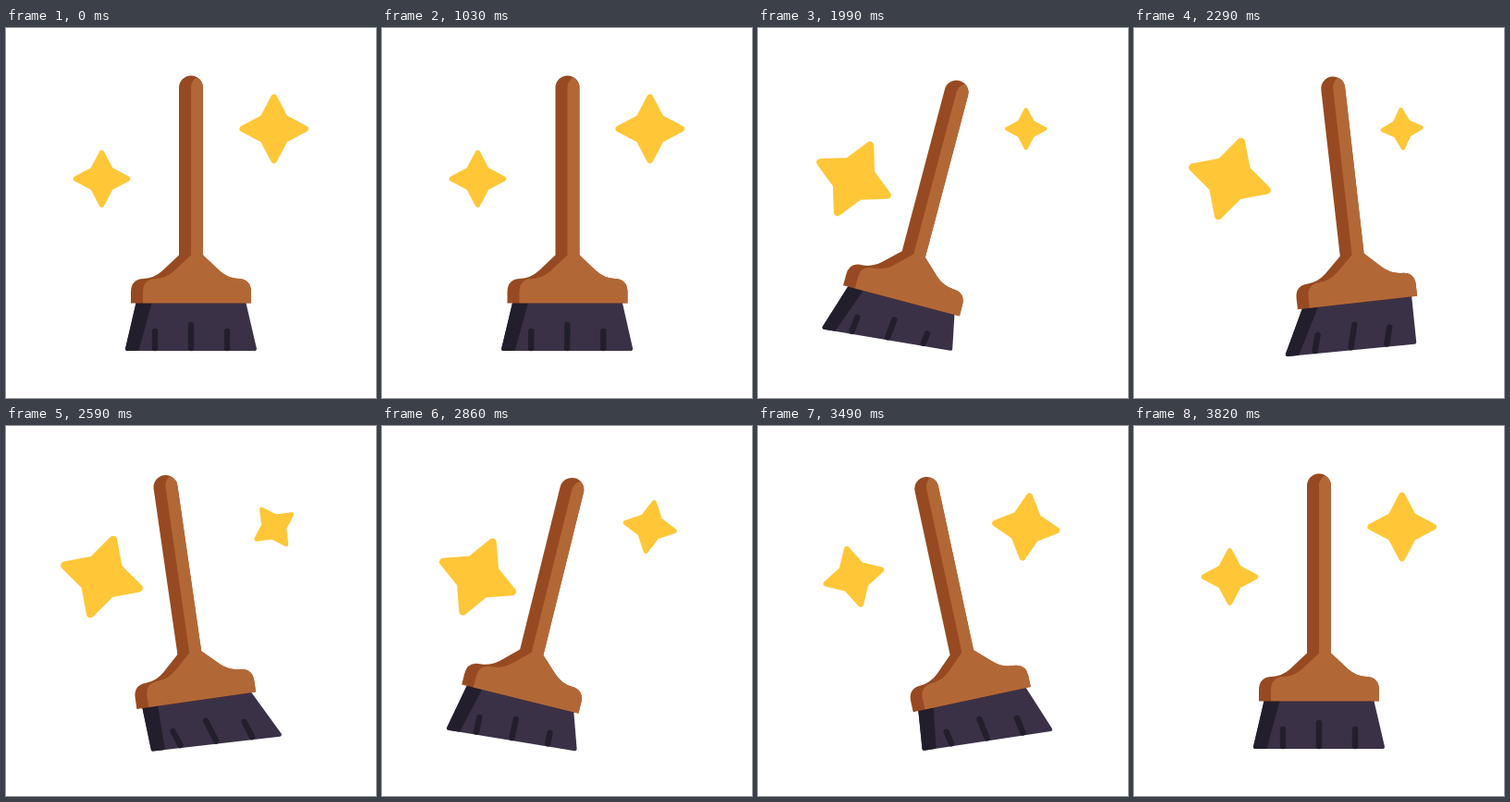
Recreate the animation shown at these times as an HTML page with a canvas. Size 400 px wide and 400 px high, loop 3.85 s.

```html
<!DOCTYPE html>
<html lang="en">
<head>
<meta charset="utf-8">
<title>Sweeping broom</title>
<style>
html, body { margin: 0; width: 100%; height: 100%; overflow: hidden; background: #fff; }
canvas { display: block; width: 400px; height: 400px; }
</style>
</head>
<body>
<canvas id="stage" width="400" height="400"></canvas>
<script>
const ctx = document.getElementById('stage').getContext('2d');
const LOOP = 3850, START = 1030, END = 3820;
const SWEEP = 458, LAG = 72;
const TURNS = [0, 1, -1, 1, -1, 1, 0];
const YELLOW = '#ffc738', WOOD = '#b26836', WOOD_DARK = '#974a21';
const HAIR = '#3b3147', HAIR_DARK = '#231e2c';

const clamp = (v, lo, hi) => Math.min(hi, Math.max(lo, v));
const ease = (t, from, to) => {
  const p = clamp((t - from) / (to - from), 0, 1);
  return p * p * (3 - 2 * p);
};

// Side to side between -1 and 1, resting at 0 before and after.
function swing(t) {
  const p = clamp((t - 1005) / SWEEP, 0, 6), i = Math.min(Math.floor(p), 5);
  return TURNS[i] + (TURNS[i + 1] - TURNS[i]) * ease(p, i, i + 1);
}

// Up to 1, a pause, and back to 0.
const pulse = (t, top, leave, end) => ease(t, START, top) - ease(t, leave, end);

const body = new Path2D('M-13-233A13 13 0 0 1 13-233V-52L31-35Q40-27 51-26.5Q65-26 65-12V0H-65V-12Q-65-26-51-26.5Q-40-27-31-35L-13-52Z');

function star(x, y, size, degrees) {
  ctx.save();
  ctx.translate(x, y);
  ctx.rotate(degrees * Math.PI / 180);
  ctx.scale(size / 37, size / 37);
  ctx.beginPath();
  for (let i = 0; i < 8; i++) {
    const r = i % 2 ? 16.4 : 33.6, a = i * Math.PI / 4;
    ctx.lineTo(r * Math.sin(a), -r * Math.cos(a));
  }
  ctx.closePath();
  ctx.fillStyle = ctx.strokeStyle = YELLOW;
  ctx.lineWidth = 6.8;
  ctx.fill();
  ctx.stroke();
  ctx.restore();
}

// The tips trail behind the handle, and the lower side is pressed short by the floor.
function bristles(sway, lean) {
  const shift = 34 * (lean - sway), press = 13 * lean * Math.abs(lean);
  const left = 51 - Math.max(press, 0), right = 51 + Math.min(press, 0);
  const length = u => (left + right) / 2 + (right - left) / 2 * u / 71;
  const shape = (color, topL, topR, bottomL, bottomR) => {
    const end = u => [u + shift, length(u) - 1.5];
    ctx.beginPath();
    ctx.moveTo(topL, -2);
    ctx.lineTo(topR, -2);
    ctx.lineTo(...end(bottomR));
    ctx.lineTo(...end(bottomL));
    ctx.closePath();
    ctx.fillStyle = ctx.strokeStyle = color;
    ctx.lineWidth = 4;
    ctx.fill();
    ctx.stroke();
  };
  shape(HAIR, -57, 57, -69, 69);
  shape(HAIR_DARK, -57, -44, -69, -58);

  ctx.lineWidth = 6.4;
  for (const u of [-39, 0, 39]) {
    const end = length(u), top = (u ? 30.5 : 23.5) * (.5 + end / 102);
    ctx.beginPath();
    ctx.moveTo(u + shift * top / end, top);
    ctx.lineTo(u + shift, end - 2.5);
    ctx.stroke();
  }
}

function broom(t) {
  const sway = swing(t), lean = swing(t - LAG);
  const angle = -14.8 * lean * Math.PI / 180;
  ctx.save();
  ctx.translate(200 + 51.5 * sway, 297.5 - 80 * (1 - Math.cos(angle)));
  ctx.rotate(angle);
  bristles(sway, lean);
  ctx.fillStyle = WOOD_DARK;
  ctx.fill(body);
  ctx.clip(body);
  ctx.translate(13, 0);
  ctx.fillStyle = WOOD;
  ctx.fill(body);
  ctx.restore();
}

function draw(now) {
  const t = now % LOOP;
  ctx.fillStyle = '#fff';
  ctx.fillRect(0, 0, 400, 400);
  ctx.lineJoin = ctx.lineCap = 'round';
  const grow = pulse(t, 2260, 2650, END), shrink = pulse(t, 1780, 2170, 3660);
  star(103.5, 163, 30.8 * (1 + .5 * grow), -73 * grow);
  star(289.7, 109, 37.3 * (1 - .39 * shrink), 180 * shrink);
  broom(t);
}

const start = performance.now();
function loop() {
  draw(performance.now() - start);
  requestAnimationFrame(loop);
}
loop();
</script>
</body>
</html>
```
